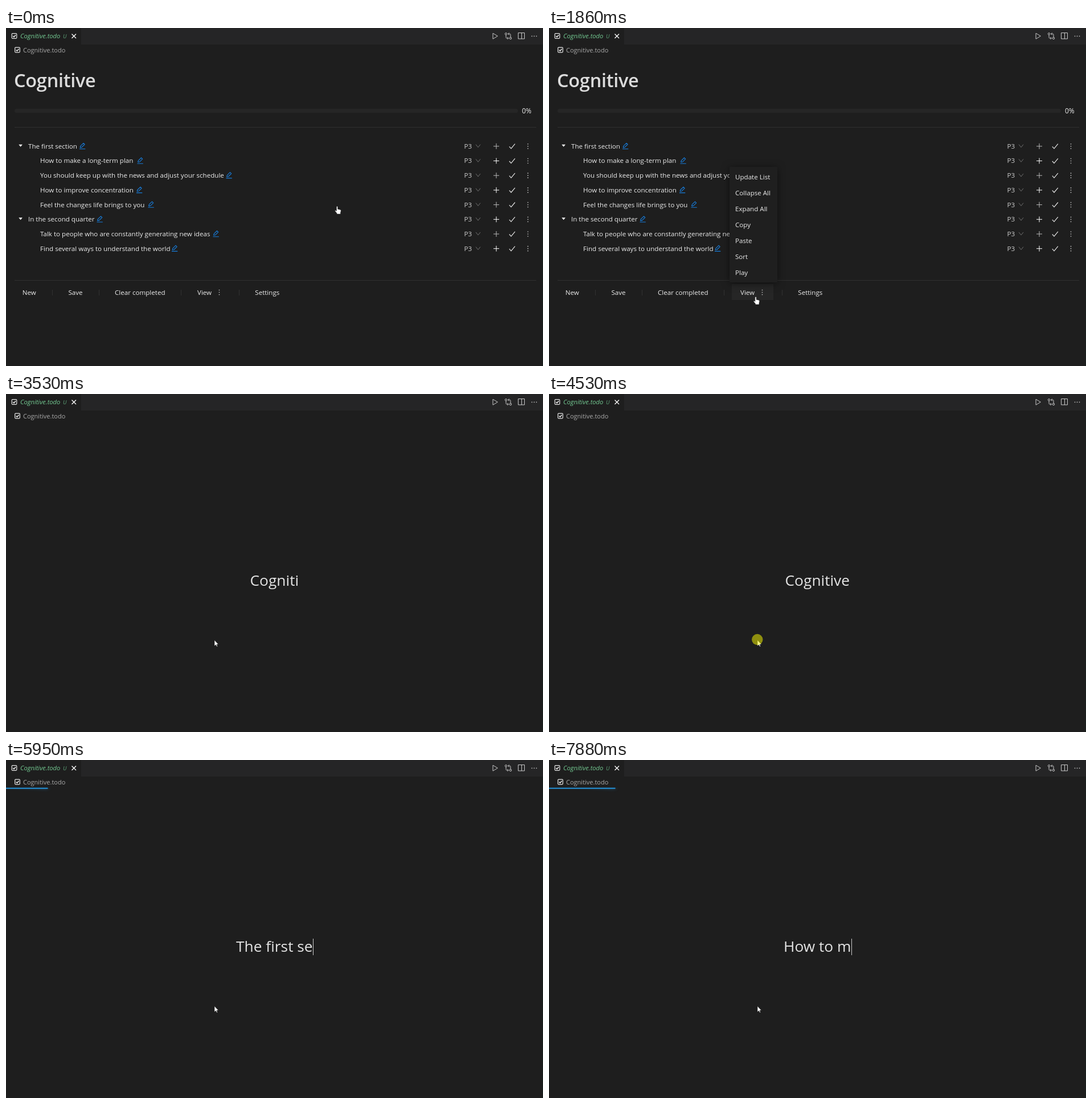
These frames come from a looping animation (943x594 px, 8000 ms). An HTML page:

```html
<!DOCTYPE html>
<html lang="en">
<head>
<meta charset="utf-8">
<title>Todo playback</title>
<style>
  html, body { margin: 0; width: 100%; height: 100%; overflow: hidden; background: #1e1e1e; }
  svg { display: block; width: 943px; height: 594px; font: 11.6px "Open Sans", "Noto Sans", sans-serif; fill: #ececec; }
  .stroke { fill: none; stroke: #c8c8c8; stroke-width: 1; }
  .rule { stroke: #303030; }
  .pencil { fill: none; stroke: #177ddc; stroke-width: 1.1; stroke-linejoin: round; }
  #title { font-size: 32.5px; font-weight: 600; letter-spacing: -.3px; fill: #dcdcdc; }
  #typed { font-size: 26.3px; text-anchor: middle; fill: #e4e4e4; }
  #menu { filter: drop-shadow(0 2px 7px rgba(0, 0, 0, .5)); }
  #bar, #glow { fill: #2492d8; }
  #glow { filter: blur(3px); }
  #click { fill: #ff0; fill-opacity: .5; }
  #hand, #arrow { fill: #fff; stroke: #111; stroke-width: .6; }
</style>
</head>
<body>
<svg viewBox="0 0 943 594">
  <defs>
    <g id="box" fill="none" stroke="#e8e8e8" stroke-width="1.2">
      <rect x="-4.3" y="-4.3" width="8.6" height="8.6" rx="1.2"/>
      <path d="M-2.4 0 L-.6 1.8 L2.6 -1.8" stroke-width="1.5"/>
    </g>
    <g id="dots"><circle cy="-4" r=".85"/><circle r=".85"/><circle cy="4" r=".85"/></g>
    <path id="pencil" class="pencil" d="M-5 5H5.3M-3.8 2.6L-3.2 -.1L2 -5.2L4.2 -3L-1 2.1Z"/>
    <clipPath id="panel"><rect y="48.7" width="943" height="546"/></clipPath>
  </defs>

  <rect width="943" height="594" fill="#1e1e1e"/>
  <rect x="132" width="811" height="29" fill="#252526"/>
  <path d="M942.5 29V594" stroke="#16261f" stroke-dasharray="4 3"/>
  <use href="#box" x="14.5" y="14"/>
  <text x="25" y="18.4" font-size="11.2" font-style="italic" fill="#73c991">Cognitive.todo</text>
  <text x="100" y="17.8" font-size="9.5" font-style="italic" fill="#5fa67a">U</text>
  <path class="stroke" style="stroke:#fff;stroke-width:1.3" d="M115.5 10.5l7.5 7.5m0-7.5l-7.5 7.5"/>
  <use href="#box" x="20" y="38.5"/>
  <text x="30" y="43.2" font-size="11" fill="#a9a9a9">Cognitive.todo</text>
  <g class="stroke">
    <path d="M855 9.2V19.2L863.3 14.2Z"/>
    <circle cx="878" cy="10.3" r="1.7"/><circle cx="886" cy="18" r="1.7"/>
    <path d="M878 12v4.6q0 1.4 1.4 1.4h3m-2-2l2 2l-2 2M886 16.3v-4.6q0 -1.4 -1.4 -1.4h-3m2 -2l-2 2l2 2"/>
    <path d="M899.5 8.5h11v10.5h-11zM905.5 8.5v10.5"/>
  </g>
  <use href="#dots" transform="translate(927.5 14.3) rotate(90)" fill="#c8c8c8"/>

  <g id="page">
    <text id="title" x="14" y="104">Cognitive</text>
    <rect x="15" y="142" width="884" height="7" rx="3.5" fill="#262626"/>
    <text x="906" y="150.3" font-size="12">0%</text>
    <path class="rule" d="M15 174.5H931M15 443.5H931"/>
    <g id="rows"></g>
    <rect id="hover" x="321" y="450" width="73" height="28" fill="#262626"/>
    <g id="footer"></g>
    <use href="#dots" x="374.5" y="464.5" fill="#c8c8c8"/>
    <path class="rule" d="M81.5 460v10M163.5 460v10M307.5 460v10M409.5 460v10"/>
    <g id="menu">
      <rect x="317" y="244" width="84" height="203" rx="1" fill="#1f1f1f"/>
      <rect id="choice" x="317" y="415" width="84" height="28" fill="#303030"/>
    </g>
  </g>

  <g id="player">
    <g clip-path="url(#panel)">
      <g id="glow"><rect x="-100" y="48.7" width="100" height="2" transform="rotate(3 -50 49.7) translate(0 -4)"/></g>
    </g>
    <rect id="bar" y="48.7" height="2"/>
    <text id="typed" x="471.3" y="336.7"></text>
    <rect id="caret" y="314" width="1" height="29" fill="#c9c9c9"/>
  </g>

  <g id="pointer">
    <path id="hand" d="M-1.2 .9Q0 -.3 1.2 .9V5.2L5.6 6.2Q7 6.7 6.8 8.2L6 11.5V14H-.6V12.6L-3.6 9Q-4.2 7.5 -2.9 7.3L-1.2 8.6Z"/>
    <path id="arrow" d="M0 0V10.4L2.4 8.2L4 11.6L5.6 10.9L4.1 7.6H7.2Z"/>
  </g>
  <circle id="click" r="9.7"/>
</svg>
<script>
const LOOP = 8000;
const $ = id => document.getElementById(id);
const label = (x, y, text, attrs = '') => `<text x="${x}" y="${y}" ${attrs}>${text}</text>`;

// Each row: text, pencil position, whether it is a section heading
const rows = [
  ['The first section', 134, true],
  ['How to make a long-term plan', 235.5],
  ['You should keep up with the news and adjust your schedule', 391.5],
  ['How to improve concentration', 234],
  ['Feel the changes life brings to you', 254.5],
  ['In the second quarter', 164.5, true],
  ['Talk to people who are constantly generating new ideas', 368.5],
  ['Find several ways to understand the world', 296],
];
$('rows').innerHTML = rows.map(([text, pencilX, section], i) => {
  const plus = i % 2 ? '#fff' : '#b8b8b8';
  return `<g transform="translate(0 ${207.5 + 25.7 * i})">
    ${section ? '<path d="M22.3 -2.8h6.6l-3.3 4z" fill="#fff"/>' : ''}
    ${label(section ? 39 : 60, 4.2, text)}
    <use href="#pencil" x="${pencilX}"/>
    ${label(804.5, 4.2, 'P3', 'fill="#d0d0d0"')}
    <path class="stroke" style="stroke:#707070" d="M825 -2.8l4 5l4 -5"/>
    <path class="stroke" style="stroke:${plus}" d="M856 .3h10M861 -4.7v10"/>
    <path class="stroke" style="stroke:#e4e4e4;stroke-width:1.2" d="M883.8 .8l3.2 3.6l6.8 -8.2"/>
    <use href="#dots" x="916.5" y=".3" fill="#c8c8c8"/>
  </g>`;
}).join('');

const buttons = [[28.8, 'New'], [109.5, 'Save'], [191, 'Clear completed'], [336, 'View'], [437.3, 'Settings']];
$('footer').innerHTML = buttons.map(([x, text]) => label(x, 469, text)).join('');

const menuItems = ['Update List', 'Collapse All', 'Expand All', 'Copy', 'Paste', 'Sort', 'Play'];
$('menu').insertAdjacentHTML('beforeend', menuItems.map((text, i) => label(327, 266.3 + 27.9 * i, text)).join(''));

const lines = [
  { from: 2930, text: 'Cognitive', keys: Array.from('Cognitive', (_, i) => 3125 + 66.5 * i) },
  { from: 4670, text: 'The first section', keys: [4930, 5000, 5060, 5130, 5230, 5360, 5430, 5490, 5560,
    5620, 5750, 5850, 6000, 6150, 6210, 6350, 6420] },
  { from: 7020, text: 'How to make a long-term plan', keys: [7290, 7360, 7420, 7490, 7560, 7690, 7750, 7820] },
];
const caretOn = [[3730, 4330], [5690, 6350], [6950, 7020], [7880, LOOP]];
const clicks = [[1520, 1660], [2660, 2860], [4530, 4670], [6890, 7020]];

const ramp = (t, a, b) => Math.min(1, Math.max(0, (t - a) / (b - a)));
const smooth = u => u * u * (3 - 2 * u);
const easeOut = u => 1 - (1 - u) ** 3;
const within = (t, spans) => spans.some(([a, b]) => t >= a && t < b);
const show = (id, on) => $(id).setAttribute('visibility', on ? 'visible' : 'hidden');
const set = (id, name, value) => $(id).setAttribute(name, value);

function drawPage(t) {
  $('page').style.display = t < lines[0].from ? '' : 'none';
  set('hover', 'opacity', ramp(t, 1150, 1450) * (1 - .6 * ramp(t, 2150, 2450)));
  const open = easeOut(ramp(t, 1560, 1830));
  set('menu', 'opacity', open);
  set('menu', 'transform', `translate(0 447) scale(1 ${.8 + .2 * open}) translate(0 -447)`);
  set('choice', 'opacity', ramp(t, 2300, 2600));
}

function drawPlayer(t) {
  const line = lines.findLast(l => t >= l.from);
  $('player').style.display = line ? '' : 'none';
  if (!line) return;
  const count = line.keys.filter(k => t >= k).length;
  $('typed').textContent = line.text.slice(0, count).trimEnd();
  set('caret', 'x', Math.round(471.3 + $('typed').getComputedTextLength() / 2));
  show('caret', within(t, caretOn));
  const progress = 73.5 * easeOut(ramp(t, 4630, 4900)) + 43 * easeOut(ramp(t, 6990, 7260));
  set('bar', 'width', progress);
  set('glow', 'transform', `translate(${progress} 0)`);
  show('glow', progress > 0);
}

function drawPointer(t) {
  const toView = smooth(ramp(t, 410, 1240));
  const toPlay = smooth(ramp(t, 2000, 2320));
  const x = 581.5 - 218.5 * toView + 3 * toPlay;
  const y = 313 + 159 * toView - 39.5 * toPlay;
  const arrow = t > 2000 && y < 450;
  set('pointer', 'transform', `translate(${x} ${y})`);
  show('hand', !arrow);
  show('arrow', arrow);
  set('click', 'cx', x - .2);
  set('click', 'cy', y - (arrow ? 1 : 0));
  show('click', within(t, clicks));
}

const start = performance.now();
function frame() {
  const t = (performance.now() - start + 4) % LOOP;
  drawPage(t);
  drawPlayer(t);
  drawPointer(t);
  requestAnimationFrame(frame);
}
frame();
</script>
</body>
</html>
```
